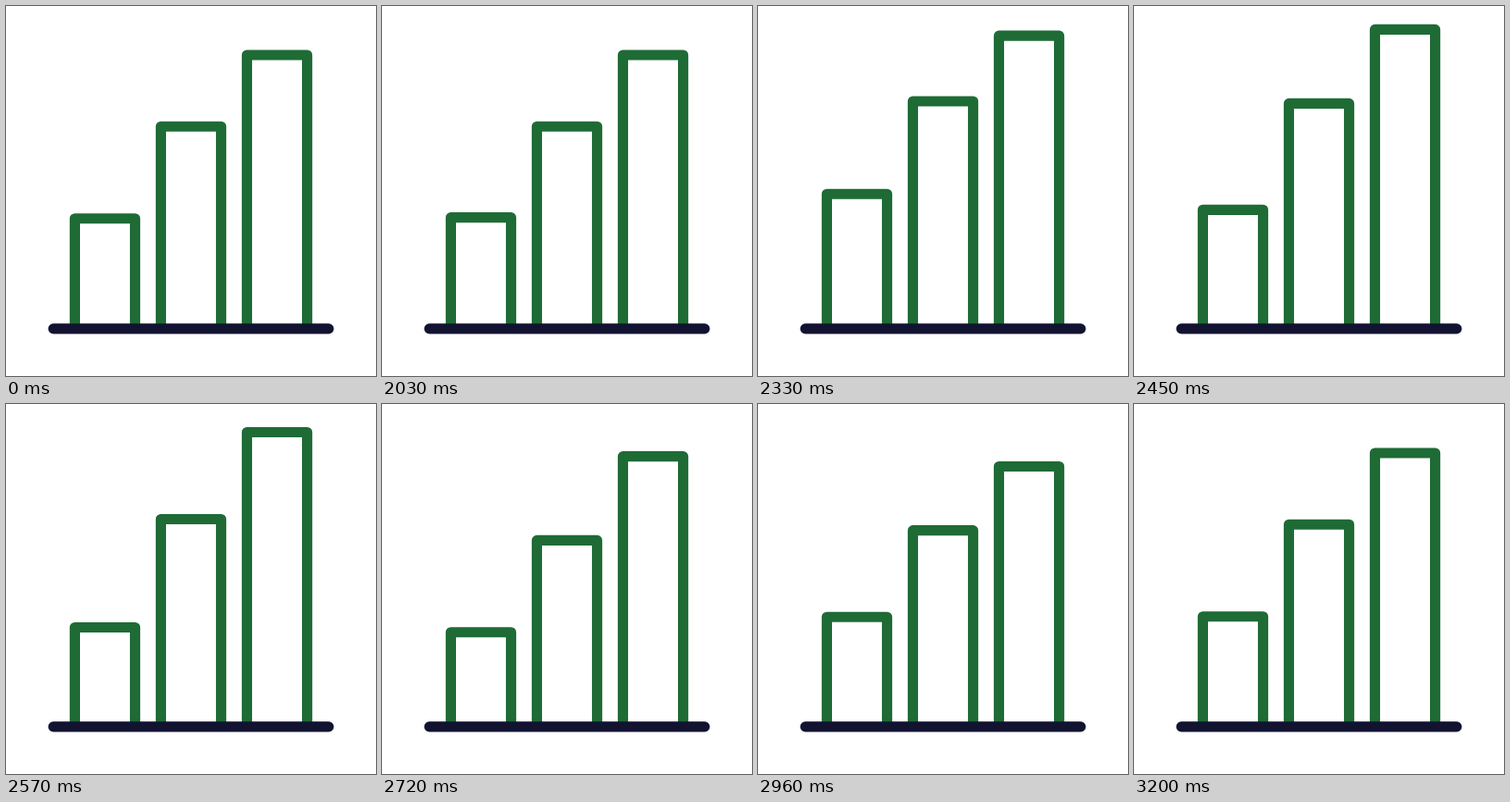
These frames come from a looping animation (400 px wide and 400 px high, 3.23 s). An HTML page:

```html
<!DOCTYPE html>
<html lang="en">
<head>
<meta charset="utf-8">
<title>Growing bars</title>
<style>
  html, body { margin: 0; height: 100%; overflow: hidden; background: #fff; }
  svg { display: block; width: 100%; height: 100%; }
  path { fill: none; stroke: #1e6b35; stroke-width: 12; stroke-linejoin: round; }
  .base { stroke: #121331; stroke-linecap: round; }
</style>
</head>
<body>
<svg viewBox="0 0 430 430">
  <path class="bar"/><path class="bar"/><path class="bar"/>
  <path class="base" d="M55 375H375"/>
</svg>
<script>
const LOOP = 3230, HOLD = 2030, STEP = 30;
const START = 1992, STAGGER = 100;
const bars = [...document.querySelectorAll('.bar')];
const tops = [247, 140, 57];

const smooth = s => s * s * (3 - 2 * s);

// Cubic Bezier easing with flat ends: solve x(s) = p by bisection
function ease(p, x1, x2) {
  let lo = 0, hi = 1;
  for (let i = 0; i < 24; i++) {
    const s = (lo + hi) / 2, r = 1 - s;
    if (3 * r * r * s * x1 + 3 * r * s * s * x2 + s ** 3 < p) lo = s; else hi = s;
  }
  return smooth(lo);
}

// Rise, dip below rest, settle
function offset(t) {
  if (t <= 0 || t >= 1000) return 0;
  if (t < 300) return -30 * ease(t / 300, 0.42, 0.15);
  if (t < 667) return -30 + 50 * smooth((t - 300) / 367);
  return 20 - 20 * smooth((t - 667) / 333);
}

function draw(now) {
  const t = now % LOOP;
  const time = t < HOLD ? 0 : HOLD + Math.floor((t - HOLD) / STEP) * STEP;
  bars.forEach((bar, i) => {
    const x = 80 + 100 * i;
    const y = tops[i] + offset(time - START - STAGGER * i);
    bar.setAttribute('d', `M${x} 375V${y}H${x + 70}V375`);
  });
}

const origin = performance.now();
function tick() {
  draw(performance.now() - origin);
  requestAnimationFrame(tick);
}
tick();
</script>
</body>
</html>
```
